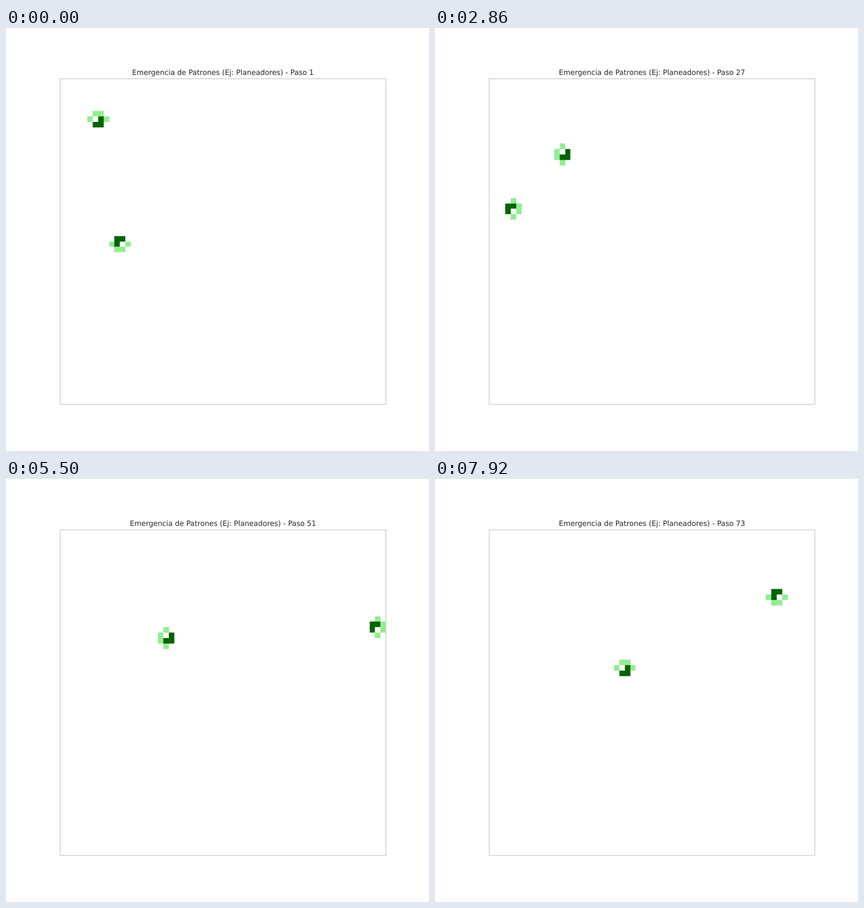
A matplotlib script that plays this animation: 748x748 px, repeating every 8000 ms.

```python
import numpy as np
import matplotlib.pyplot as plt
from matplotlib.animation import FuncAnimation
from matplotlib.patches import Rectangle

STAGE = 748
LAYOUT = 1000  # layout units across the stage
SIZE = 60
STEPS = 73
STEP_MS = 110
LOOP_MS = 8000
TICK_MS = 20

# white: empty, light green: born or dying, dark green: surviving
PALETTE = np.array([(255, 255, 255), (144, 238, 144), (0, 100, 0)])
GLIDER = np.array([[0, 0, 1], [1, 0, 1], [0, 1, 1]])


def evolve(grid):
    """One Game of Life generation on a torus."""
    neighbours = sum(
        np.roll(grid, (dy, dx), (0, 1))
        for dy in (-1, 0, 1) for dx in (-1, 0, 1) if dy or dx
    )
    return ((neighbours == 3) | ((grid == 1) & (neighbours == 2))).astype(int)


def simulate():
    """Sum each pair of successive generations into a 0/1/2 state map."""
    grid = np.zeros((SIZE, SIZE), dtype=int)
    grid[6:9, 5:8] = GLIDER
    grid[29:32, 10:13] = GLIDER[::-1, ::-1]
    states = []
    for _ in range(STEPS):
        following = evolve(grid)
        states.append(grid + following)
        grid = following
    return states


def coverage(start, length):
    """Share of each stage pixel covered by each cell along one axis."""
    edges = (start + np.round(np.linspace(0, length, SIZE + 1))) * STAGE / LAYOUT
    pixel = np.arange(STAGE)[:, None]
    overlap = np.minimum(edges[1:], pixel + 1) - np.maximum(edges[:-1], pixel)
    return overlap.clip(0)


ROWS = coverage(119, 771)
COLUMNS = coverage(128, 770)


def paint(state):
    """Antialiased picture of the grid on the whole stage."""
    ink = 255.0 - PALETTE[state]
    shade = [ROWS @ ink[..., c] @ COLUMNS.T for c in range(3)]
    return np.round(255 - np.stack(shade, axis=-1)).astype(np.uint8)


pictures = [paint(state) for state in simulate()]

plt.rcParams["font.family"] = "DejaVu Sans"
plt.rcParams["text.hinting"] = "no_hinting"
fig = plt.figure(figsize=(10, 10), dpi=STAGE / 10, facecolor="white")
ax = fig.add_axes([0, 0, 1, 1])
ax.axis("off")
image = ax.imshow(pictures[0], extent=(0, LAYOUT, LAYOUT, 0), interpolation="nearest")
ax.add_patch(Rectangle((128, 120), 770, 770, fill=False, edgecolor="0.8",
                       linewidth=1.25, snap=False))
title = ax.text(512.5, 111, "", fontsize=12.25, color="0.15",
                ha="center", va="baseline")


def update(tick):
    step = min((tick * TICK_MS + TICK_MS // 2) // STEP_MS, STEPS - 1)
    image.set_data(pictures[step])
    title.set_text(f"Emergencia de Patrones (Ej: Planeadores) - Paso {step + 1}")
    return image, title


anim = FuncAnimation(fig, update, frames=LOOP_MS // TICK_MS, interval=TICK_MS,
                     repeat=True, repeat_delay=0, blit=False)
plt.show()
```
